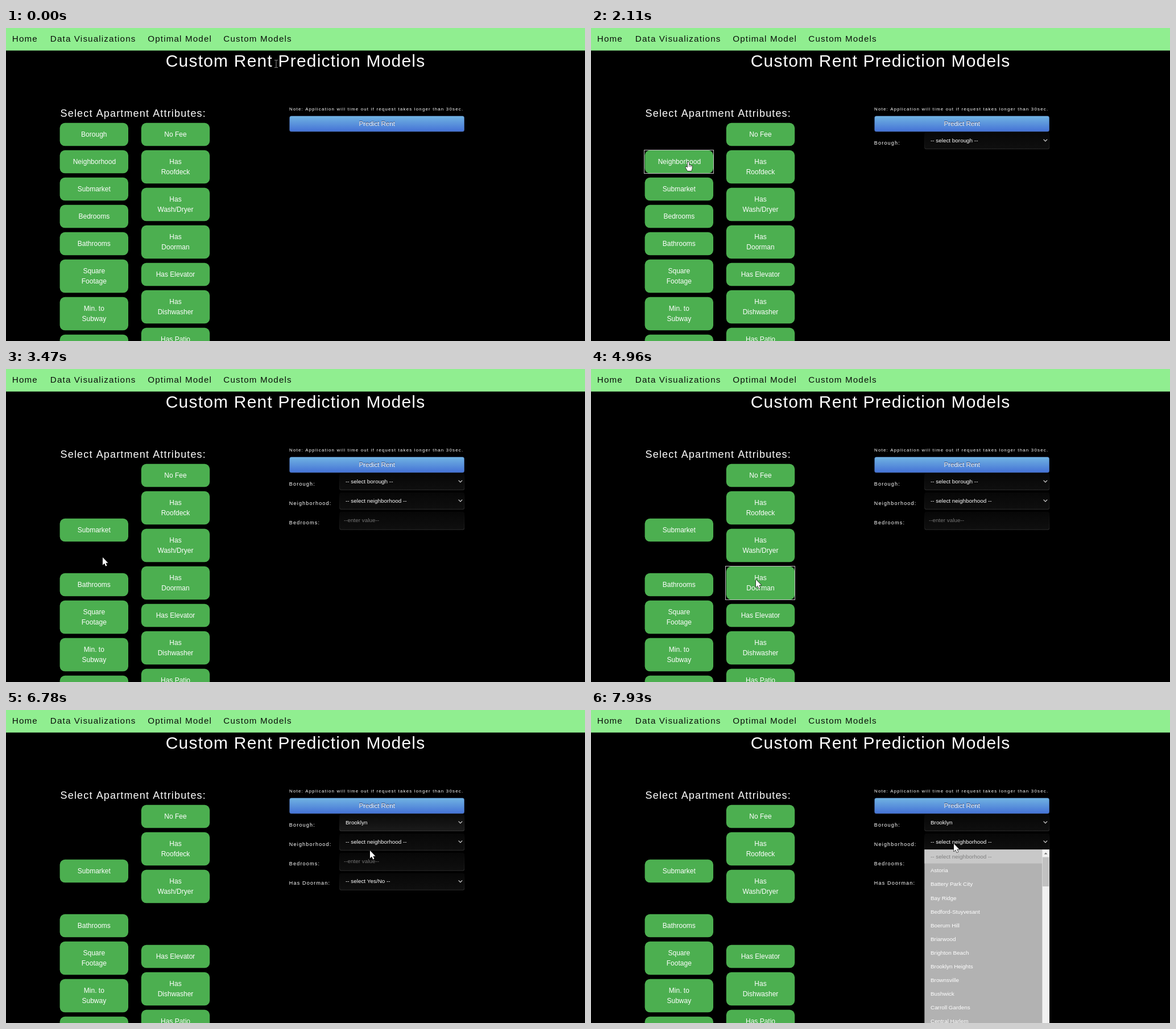
Recreate the animation shown at these times as an HTML page with a canvas. Size 1018x550 px, loop 8 s.

```html
<!DOCTYPE html>
<html lang="en">
<head>
<meta charset="utf-8">
<title>Custom Rent Prediction Models</title>
<style>
html, body { margin: 0; width: 100%; height: 100%; overflow: hidden; background: #000; }
canvas { display: block; width: 1018px; height: 550px; }
</style>
</head>
<body>
<canvas id="stage" width="1018" height="550"></canvas>
<script>
const LOOP = 8000;
const ctx = document.getElementById('stage').getContext('2d');

// Moments at which the form changes
const T = {
  borough: 1235, neighborhood: 2207, bedrooms: 3470, doorman: 5060,
  openBorough: 6010, hover: 6470, picked: 6780, blur: 7640, openNeighborhood: 7737
};

const column = (x, labels) => {
  let y = 166.8;
  return labels.map(label => {
    const lines = label.split('|');
    const h = lines.length > 1 ? 58.5 : 40.5;
    const b = { x, y, w: 120.4, h, lines };
    y += h + 7.5;
    return b;
  });
};
const left = column(94.6, ['Borough', 'Neighborhood', 'Submarket', 'Bedrooms', 'Bathrooms',
  'Square|Footage', 'Min. to|Subway', 'Floor']);
const right = column(237.8, ['No Fee', 'Has|Roofdeck', 'Has|Wash/Dryer', 'Has|Doorman',
  'Has Elevator', 'Has|Dishwasher', 'Has Patio']);
const buttons = [...left, ...right];

// Clicked buttons: focus ring first, then gone
const click = (b, ring, gone) => Object.assign(b, { ring, gone });
click(left[0], 1140, T.borough);
click(left[1], 2110, T.neighborhood);
click(left[3], 3390, T.bedrooms);
click(right[3], 4960, T.doorman);

const boroughs = ['Brooklyn', 'Manhattan', 'Queens'];
const hoods = ['Astoria', 'Battery Park City', 'Bay Ridge', 'Bedford-Stuyvesant', 'Boerum Hill',
  'Briarwood', 'Brighton Beach', 'Brooklyn Heights', 'Brownsville', 'Bushwick',
  'Carroll Gardens', 'Central Harlem'];

// Pointer moves: start, last step, step count, destination
const start = [475, 63];
const moves = [
  [90, 760, 8, 177, 184],
  [1330, 1520, 3, 171, 235],
  [2305, 2890, 7, 171, 332],
  [2980, 2980, 1, 170, 331],
  [3670, 3870, 3, 290, 370],
  [5350, 5820, 6, 673, 205],
  [6380, 6470, 2, 640, 247],
  [6980, 7460, 6, 638, 235]
];

function pointerAt(t) {
  let [x, y] = start;
  for (const [t0, t1, n, px, py] of moves) {
    if (t < t0) break;
    const k = n > 1 ? Math.min(n, 1 + Math.floor((t - t0) / (t1 - t0) * (n - 1) + 1e-6)) : 1;
    const u = k / n, e = u * u * (3 - 2 * u);
    x += (px - x) * e;
    y += (py - y) * e;
  }
  return [x, y];
}

function text(s, x, y, size, color = '#fff', spacing = 0, align = 'left') {
  ctx.font = size + 'px "Liberation Sans", Arial, sans-serif';
  ctx.letterSpacing = spacing + 'px';
  ctx.textAlign = align;
  ctx.fillStyle = color;
  ctx.fillText(s, x, y);
}

function rect(x, y, w, h, color) {
  ctx.fillStyle = color;
  ctx.fillRect(x, y, w, h);
}

function round(x, y, w, h, r, fill) {
  ctx.beginPath();
  ctx.roundRect(x, y, w, h, r);
  ctx.fillStyle = fill;
  ctx.fill();
}

function shade(y, h, top, bottom) {
  const g = ctx.createLinearGradient(0, y, 0, y + h);
  g.addColorStop(0, top);
  g.addColorStop(1, bottom);
  return g;
}

function drawPage() {
  rect(0, 0, 1018, 550, '#000');
  rect(0, 0, 1018, 39.6, '#90ee90');
  [['Home', 10.8], ['Data Visualizations', 77.8], ['Optimal Model', 249.2], ['Custom Models', 382.3]]
    .forEach(([s, x]) => text(s, x, 24, 15.2, '#0a0f0a', 1.15));
  text('Custom Rent Prediction Models', 280.7, 68, 30, '#fff', 1.2);
  text('Select Apartment Attributes:', 95.6, 155.5, 18, '#fff', 1.15);
  text('Note: Application will time out if request takes longer than 30sec.', 498, 145, 7.9, '#fff', 1.2);
  round(498.3, 154.4, 307.6, 27.8, 3.5, '#4668a8');
  round(499, 155, 306.2, 26.6, 3, shade(155, 26, '#70b3e2', '#4674d6'));
  text('Predict Rent', 652.2, 171.4, 11.5, '#283966', 0, 'center');
  text('Predict Rent', 652.2, 172.2, 11.5, '#fff', 0, 'center');
}

function drawButton(b, t) {
  if (t >= b.gone) return;
  round(b.x, b.y, b.w, b.h, 9, '#4caf50');
  const mid = b.y + b.h / 2 + 4.2 - (b.lines.length - 1) * 9;
  b.lines.forEach((s, i) => {
    // The widest label overflows its padding to the right
    if (s === 'Neighborhood') text(s, 117.7, mid, 12);
    else text(s, b.x + b.w / 2, mid + i * 18, 12, '#fff', 0, 'center');
  });
  if (t >= b.ring) {
    ctx.strokeStyle = '#c4c4c4';
    ctx.lineWidth = 1;
    const x = Math.floor(b.x) - .5, y = Math.floor(b.y) + .5;
    ctx.strokeRect(x, y, 122, Math.round(b.h));
  }
}

function drawField(label, value, labelY, y, h, opts = {}) {
  text(label, 497.8, labelY, 9, '#fff', 1.2);
  round(586.3, y, 219.8, h, 3, shade(y, h, '#050505', opts.focus ? '#343434' : '#2a2a2a'));
  round(587, y, 218.4, h - 1, 3, opts.focus ? shade(y, h, '#0a0a0a', '#1b1b1b') : shade(y, h, '#070707', '#0f0f0f'));
  if (opts.input) {
    text(value, 594, y + 18.2, 9.9, '#757575');
    return;
  }
  text(value, 597, y + 17.5, 9.9);
  ctx.strokeStyle = '#ddd';
  ctx.lineWidth = 1.1;
  ctx.beginPath();
  ctx.moveTo(795.6, y + 12.6);
  ctx.lineTo(798.9, y + 15.9);
  ctx.lineTo(802.2, y + 12.6);
  ctx.stroke();
}

function drawMenu(y, head, items, h, active = -1) {
  rect(586.3, y, 219.7, h, '#b2b2b2');
  const rowY = i => y + .4 + (i + 1) * 24.1;
  rect(586.3, active < 0 ? y : rowY(active), 219.7, 24.4, '#c8c8c8');
  text(head, 597, y + 15.9, 9.9, '#808080');
  items.forEach((s, i) => text(s, 597, rowY(i) + 15.6, 9.9, i === active ? '#000' : '#fff'));
}

function drawScrollbar() {
  rect(793.4, 245.3, 12.6, 304.7, '#f1f1f1');
  rect(793.9, 258.5, 11.4, 51.5, '#c1c1c1');
  ctx.fillStyle = '#707070';
  ctx.beginPath();
  ctx.moveTo(796.7, 253.6);
  ctx.lineTo(799.6, 250.4);
  ctx.lineTo(802.5, 253.6);
  ctx.fill();
}

function drawForm(t) {
  if (t >= T.borough)
    drawField('Borough:', t >= T.picked ? 'Brooklyn' : '-- select borough --', 205, 183, 30,
      { focus: t >= T.picked && t < T.blur });
  if (t >= T.neighborhood) drawField('Neighborhood:', '-- select neighborhood --', 239, 217, 30);
  if (t >= T.bedrooms) drawField('Bedrooms:', '--enter value--', 273, 251, 31.7, { input: true });
  if (t >= T.doorman) drawField('Has Doorman:', '-- select Yes/No --', 306.8, 286.8, 30);
  if (t >= T.openBorough && t < T.picked)
    drawMenu(211, '-- select borough --', boroughs, 97, t >= T.hover ? 0 : -1);
  if (t >= T.openNeighborhood) {
    drawMenu(245.2, '-- select neighborhood --', hoods, 304.8);
    drawScrollbar();
  }
}

const arrow = new Path2D('M0 0V13.4L3.1 10.6L5.3 15.4L7.4 14.5L5.3 9.8H9.4Z');
const hand = new Path2D('M-1.2 1Q0 -.6 1.2 1V6Q2.4 4.9 3.3 6.3Q4.5 5.4 5.2 6.9' +
  'Q6.6 6.2 6.8 8V11.5L5.4 16H-1.2L-4.5 10.5Q-4.9 8.6 -3 8.7L-1.2 10.4Z');
const beam = new Path2D('M-3 -6.5H-.8L0 -5.7L.8 -6.5H3M0 -5.7V5.7M-3 6.5H-.8L0 5.7L.8 6.5H3');

function drawPointer(t) {
  const [x, y] = pointerAt(t);
  ctx.save();
  ctx.translate(x, y);
  if (y < 75) {
    ctx.strokeStyle = '#858585';
    ctx.lineWidth = 1.1;
    ctx.stroke(beam);
  } else {
    const over = t < T.bedrooms && buttons.some(b => !(t >= b.gone) &&
      x > b.x && x < b.x + b.w && y > b.y && y < b.y + b.h);
    const shape = over ? hand : arrow;
    ctx.fillStyle = '#fff';
    ctx.strokeStyle = '#111';
    ctx.lineWidth = 1.3;
    ctx.lineJoin = 'round';
    ctx.stroke(shape);
    ctx.fill(shape);
    if (over) {
      ctx.lineWidth = .6;
      ctx.stroke(new Path2D('M1.2 6V9M3.3 6.5V9.2M5.2 7V9.4'));
    }
  }
  ctx.restore();
}

function draw(t) {
  drawPage();
  buttons.forEach(b => drawButton(b, t));
  drawForm(t);
  drawPointer(t);
}

const origin = performance.now();
function tick() {
  draw((performance.now() - origin) % LOOP);
  requestAnimationFrame(tick);
}
tick();
</script>
</body>
</html>
```
